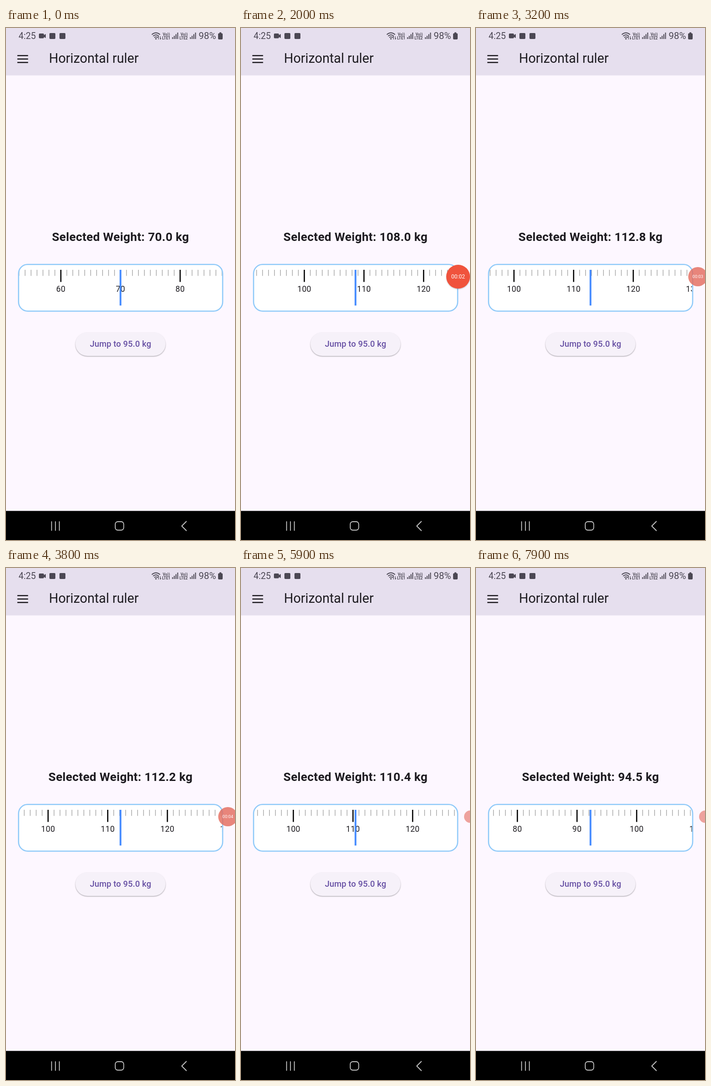
These frames come from a looping animation (501 px wide and 1118 px high, 8000 ms). An HTML page:

```html
<!DOCTYPE html>
<html lang="en">
<head>
<meta charset="utf-8">
<title>Horizontal ruler</title>
<style>
  html, body { margin: 0; width: 100%; height: 100%; overflow: hidden; background: #fdf7ff; }
  svg { display: block; width: 100%; height: 100%; }
  text { font-family: Roboto, sans-serif; }
  .mid { text-anchor: middle; }
  .status { fill: #4b4753; }
  .line { fill: none; stroke-linecap: round; stroke-linejoin: round; }
</style>
</head>
<body>
<svg viewBox="0 0 501 1118" xmlns="http://www.w3.org/2000/svg">
  <defs>
    <clipPath id="window"><rect x="28.5" y="517.5" width="444" height="99.5" rx="18"/></clipPath>
    <filter id="soft" x="-20%" y="-20%" width="140%" height="150%"><feGaussianBlur stdDeviation="1.3"/></filter>
    <g id="bars">
      <path d="M1 24v-4M4.7 24v-7M8.4 24v-10.5M12.1 24v-14" stroke="#4b4753" stroke-width="2" fill="none"/>
    </g>
  </defs>

  <rect width="501" height="1118" fill="#fdf7ff"/>
  <rect width="501" height="103.5" fill="#e6dfee"/>

  <g class="status">
    <text x="27.5" y="24" font-size="19.5">4:25</text>
    <path d="M74 12h7q2 0 2 2v1.5l4-2.5v9l-4-2.5v1q0 2-2 2h-7q-2 0-2-2v-6.500q0-2 2-2z"/>
    <rect x="95" y="11" width="13" height="13" rx="2"/>
    <rect x="117" y="11" width="13" height="13" rx="2"/>
    <path class="line" d="M319.500 14q8.500-7 17 0M322.300 17.300q5.700-4.600 11.400 0M325 20.500q3-2.300 6 0" stroke="#4b4753" stroke-width="1.8"/>
    <path d="M328 21.500l2 2-2 2-2-2z"/>
    <path class="line" d="M333.500 24.500v-6m-1.500 1.800l1.500-1.800M337.500 18.500v6m1.500-1.800l-1.500 1.800" stroke="#4b4753" stroke-width="1.2"/>
    <g font-size="8.200" font-weight="700">
      <text x="343" y="16.500">Vo))</text><text x="341.500" y="25">LTE1</text>
      <text x="382" y="16.500">Vo))</text><text x="379.500" y="25">LTE2</text>
    </g>
    <use href="#bars" x="363.500"/>
    <use href="#bars" x="402.500"/>
    <text x="421.500" y="24" font-size="20.500">98%</text>
    <path d="M467 9.500h4v2h1q2 0 2 2v9.500q0 2-2 2h-6q-2 0-2-2v-9.500q0-2 2-2h1z"/>
  </g>

  <path d="M24.800 60.200h23.500M24.800 67.700h23.500M24.800 75.200h23.500" stroke="#1d1b20" stroke-width="2.600"/>
  <text x="94" y="76" font-size="28.700" fill="#1d1b20">Horizontal ruler</text>

  <text id="weight" class="mid" x="250.500" y="465" font-size="26.100" font-weight="700" letter-spacing=".33" fill="#1d1b20"></text>

  <rect x="27.500" y="516.200" width="446.500" height="102" rx="20" fill="#fff"/>
  <g clip-path="url(#window)"><g id="scale"></g></g>
  <rect x="27.500" y="516.200" width="446.500" height="102" rx="20" fill="none" stroke="#90caf9" stroke-width="2.600"/>
  <rect x="248.550" y="528" width="3.900" height="78" fill="#448aff"/>

  <rect x="152" y="665.800" width="197" height="51.500" rx="25.800" opacity=".32" filter="url(#soft)"/>
  <rect x="152" y="664" width="197" height="52" rx="26" fill="#f6f1f9"/>
  <rect id="press" x="152" y="664" width="197" height="52" rx="26" fill="#6750a4"/>
  <text class="mid" x="250.500" y="696" font-size="18.270" font-weight="500" letter-spacing=".13" fill="#6750a4">Jump to 95.0 kg</text>

  <g id="bubble">
    <circle id="shade" cx="475" cy="544.500" r="26" opacity=".2" filter="url(#soft)"/>
    <circle id="disc" cy="543"/>
    <text id="clock" class="mid" fill="#fff"></text>
  </g>

  <rect y="1054.500" width="501" height="63.500"/>
  <g class="line" stroke="#c6c6c6" stroke-width="1.800">
    <path d="M99.700 1078v19M108.200 1078v19M116.700 1078v19M394.500 1077.500l-10 10 10 10"/>
    <rect x="239" y="1078" width="18.500" height="18.500" rx="5.500"/>
  </g>
</svg>
<script>
const LOOP = 8000, STEP = 100, LAG = 80;
const UNIT = 13.05, CENTER = 250.5;
const $ = id => document.getElementById(id);

// Weight under the pointer: [ms, kg]
const path = [
  [0, 70], [200, 70], [500, 87], [720, 95.6], [800, 96.6], [1200, 98.2], [1600, 98.2],
  [1920, 108], [2000, 108.58], [2500, 111], [3120, 112.8], [3200, 112.83], [3800, 112.14],
  [5000, 112.14], [5800, 110.44], [5900, 110.42], [6600, 109.4], [7050, 109.4],
  [7600, 95], [7800, 95], [7820, 94.5], [7900, 92.26], [8000, 90]
];

const slope = i => (path[i + 1][1] - path[i][1]) / (path[i + 1][0] - path[i][0]);

// Tangent that never overshoots the neighbouring points
function tangent(i) {
  if (i === 0 || i === path.length - 1) return 0;
  const a = slope(i - 1), b = slope(i);
  return a * b > 0 ? 2 * a * b / (a + b) : 0;
}

function weightAt(t) {
  if (t <= 0) return path[0][1];
  let i = 0;
  while (i < path.length - 2 && path[i + 1][0] <= t) i++;
  const [t0, v0] = path[i], [t1, v1] = path[i + 1];
  const d = t1 - t0, u = (t - t0) / d, w = 1 - u;
  return w * w * ((1 + 2 * u) * v0 + u * d * tangent(i))
       + u * u * ((3 - 2 * u) * v1 - w * d * tangent(i + 1));
}

function buildScale() {
  let marks = '';
  for (let kg = 40; kg <= 140; kg++) {
    const x = (kg * UNIT).toFixed(2), major = kg % 10 === 0;
    marks += `<path d="M${x} 528v${major ? 26.5 : 13.3}" stroke="${major ? '#000' : '#9e9e9e'}" stroke-width="${major ? 2.6 : 1.3}"/>`;
    if (major) marks += `<text class="mid" x="${x}" y="576" font-size="17.6" letter-spacing=".3" fill="#1d1b20">${kg}</text>`;
  }
  $('scale').innerHTML = marks;
}

function set(el, attrs) {
  for (const name in attrs) el.setAttribute(name, attrs[name]);
}

// The recorder bubble shrinks twice and docks at the right edge
function drawBubble(t) {
  const big = t < 2500, docked = t >= 4000;
  const [x, r, fill] = big ? [475, 26, '#f0533d']
    : docked ? [501.5, 13.5, '#e8857c'] : [485.3, 21, '#e4695a'];
  set($('bubble'), { visibility: t < 100 ? 'hidden' : 'visible' });
  set($('shade'), { opacity: big ? 0.2 : 0 });
  set($('disc'), { cx: x, r, fill, opacity: big ? 1 : docked ? 0.75 : 0.8 });
  set($('clock'), { x, y: big ? 547.3 : 546.3, 'font-size': big ? 12 : 9.4 });
  const seconds = Math.floor((t + 120) / 970);
  $('clock').textContent = docked ? '' : '00:' + String(seconds).padStart(2, '0');
}

function draw(t) {
  set($('scale'), { transform: `translate(${(CENTER - weightAt(t) * UNIT).toFixed(2)})` });
  $('weight').textContent = `Selected Weight: ${weightAt(t - LAG).toFixed(1)} kg`;
  const held = t - 7100;
  set($('press'), { opacity: held < 0 ? 0 : Math.max(0, 0.1 * (1 - held / 400)) });
  drawBubble(t);
}

buildScale();
const start = performance.now();
function tick() {
  const t = (performance.now() - start) % LOOP;
  draw(Math.floor(t / STEP) * STEP);
  requestAnimationFrame(tick);
}
tick();
</script>
</body>
</html>
```
